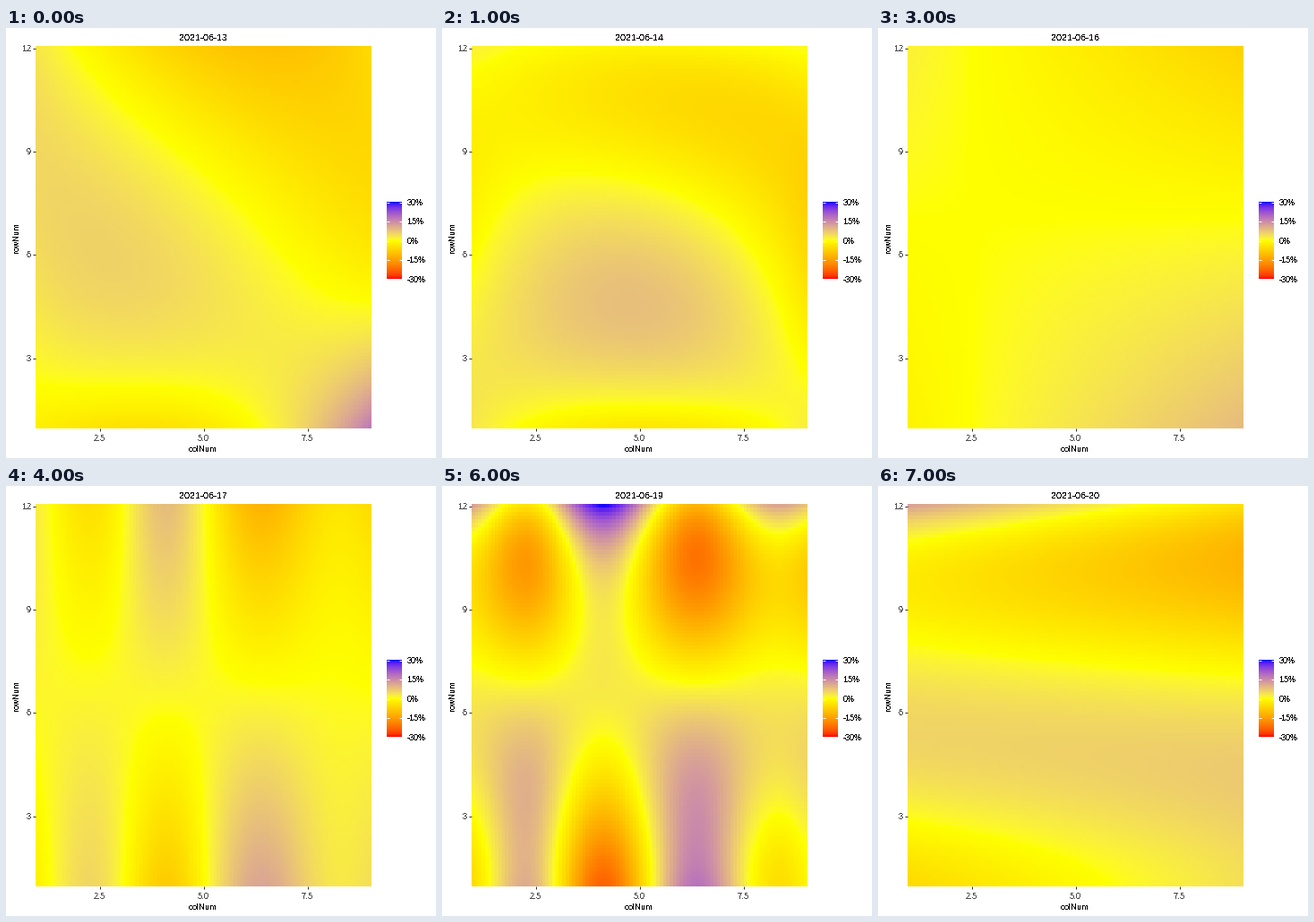
These frames come from a looping animation (480 px wide and 480 px high, 8000 ms). A matplotlib script:

```python
import numpy as np
import matplotlib.pyplot as plt
from matplotlib.animation import FuncAnimation

SIZE, DPI = 480, 72
LEFT, RIGHT, TOP, BOTTOM = 33, 408, 20, 447
CELLS = 100
LIMIT = 30
plt.rcParams.update({"font.family": "Liberation Sans",
                     "text.antialiased": False,
                     "text.hinting": "native",
                     "text.hinting_factor": 1})

RED_LAB = np.array([53.24, 80.09, 67.20])
YELLOW_LAB = np.array([97.14, -21.55, 94.48])
BLUE_LAB = np.array([32.30, 79.19, -107.86])

# Plot coordinates, and the same scaled to -1..1
x = np.linspace(1, 9, CELLS)[None, :]
y = np.linspace(12, 1, CELLS)[:, None]
u = (x - 5) / 4
v = (y - 6.5) / 5.5


def lab_to_rgb(lab):
    fy = (lab[..., 0] + 16) / 116
    f = np.stack([fy + lab[..., 1] / 500, fy, fy - lab[..., 2] / 200], -1)
    xyz = np.where(f > 6 / 29, f ** 3, 3 * (6 / 29) ** 2 * (f - 4 / 29))
    xyz = xyz * [0.95047, 1.0, 1.08883]
    to_linear = np.array([[3.2406, -1.5372, -0.4986],
                          [-0.9689, 1.8758, 0.0415],
                          [0.0557, -0.2040, 1.0570]])
    lin = np.clip(xyz @ to_linear.T, 0, 1)
    return np.where(lin <= 0.0031308, 12.92 * lin,
                    1.055 * lin ** (1 / 2.4) - 0.055)


def colour(percent):
    """Diverging red - yellow - blue scale, blended in Lab."""
    t = np.clip(np.asarray(percent) / LIMIT, -1, 1)[..., None]
    end = np.where(t < 0, RED_LAB, BLUE_LAB)
    return np.clip(lab_to_rgb(YELLOW_LAB + np.abs(t) * (end - YELLOW_LAB)), 0, 1)


def profile(*coefs):
    """Polynomial up the rows; each coefficient may vary along the columns."""
    return sum(c * v ** i for i, c in enumerate(coefs))


def ripple(*heights):
    """Row of bumps across the columns."""
    centres = (0.8, 2.3, 4.14, 6.36, 8.3, 9.3)
    widths = (0.6, 0.95, 1.0, 1.15, 0.8, 0.7)
    return sum(h * np.exp(-((x - c) / w) ** 2)
               for h, c, w in zip(heights, centres, widths))


bend = u - u ** 3

day13 = profile(3 - 4.45 * u - 2.75 * u ** 2 - 2.5 * bend,
                -6 - 5.6 * u + 3.1 * u ** 2,
                -9 + 7 * u + 11.6 * u ** 2,
                3.5 - 1.5 * u - 5 * u ** 2)

day14 = profile(5.2 - 2.8 * u - 9 * u ** 2,
                -15 + 8.6 * u ** 2 - 5 * bend,
                -14 + 2.3 * u + 19.7 * u ** 2,
                16 - 10.2 * u ** 2 + 5 * bend,
                6 - 6 * u ** 2)

day16 = 0.22 * (7 - y) * (x - 2.5)

day18 = (2.2 - 2 * v ** 2 - 0.04 * (x - 1) ** 2
         + v * ripple(5, -11, 19.5, -19, 1.5, -3))

day19 = (profile(2.6, -14, -23.6, 21.7, 24)
         + v * ripple(4, -16, 20, -23, 2.5, -5))

day20 = profile(3.3 - u, -15.8 - 4.7 * u, -21.1 + 1.3 * u,
                18 - 2 * u, 19 - 2 * u)

days = [day13, day14, (day14 + day16) / 2, day16,
        (day16 + day18) / 2, day18, day19, day20]
pictures = [colour(day) for day in days]

fig = plt.figure(figsize=(SIZE / DPI, SIZE / DPI), dpi=DPI, facecolor="white")
ax = fig.add_axes([0, 0, 1, 1])


def label(px, py, text, size=9, ha="center", color="black", **kw):
    return ax.text(px, py, text, fontsize=size, ha=ha, va="baseline",
                   color=color, **kw)


def segment(x0, y0, x1, y1, color):
    ax.plot([x0, x1], [y0, y1], color=color, lw=1, solid_capstyle="butt")


def to_pixel(value, low, high, start, end):
    """Pixel of a value on an axis padded by half a cell at both ends."""
    step = (high - low) / (CELLS - 1)
    return start + (value - low + step / 2) / (step * CELLS) * (end - start)


panel = ax.imshow(pictures[0], extent=(LEFT, RIGHT, BOTTOM, TOP),
                  aspect="auto", interpolation="nearest")

# Axis ticks and titles
for value in (2.5, 5.0, 7.5):
    px = int(to_pixel(value, 1, 9, LEFT, RIGHT))
    segment(px + 0.5, BOTTOM, px + 0.5, BOTTOM + 3, "#333333")
    label(px, 461, f"{value:.1f}", color="#4d4d4d")
for value in (3, 6, 9, 12):
    py = int(to_pixel(value, 1, 12, BOTTOM, TOP))
    segment(LEFT - 3, py + 0.5, LEFT, py + 0.5, "#333333")
    label(28, py + 4, str(value), ha="right", color="#4d4d4d")
label(220, 473, "colNum")
label(14, 234, "rowNum", rotation=90, rotation_mode="anchor")

# Colour bar
ramp = colour(np.linspace(LIMIT, -LIMIT, 86))[:, None]
ax.imshow(ramp, extent=(425, 442, 280, 194), aspect="auto",
          interpolation="nearest")
for value in (30, 15, 0, -15, -30):
    py = 237 - value / LIMIT * 43
    for px in (425, 439):
        segment(px, int(py) + 0.5, px + 3, int(py) + 0.5, "white")
    label(448, int(py) + 4, f"{value}%", ha="left")

title = label(220, 14, "", size=10)

ax.set_xlim(0, SIZE)
ax.set_ylim(SIZE, 0)
ax.axis("off")


def draw(i):
    panel.set_data(pictures[i])
    title.set_text(f"2021-06-{13 + i}")
    return panel, title


anim = FuncAnimation(fig, draw, frames=len(days), interval=1000, repeat=True,
                     repeat_delay=0, blit=False)
plt.show()
```
